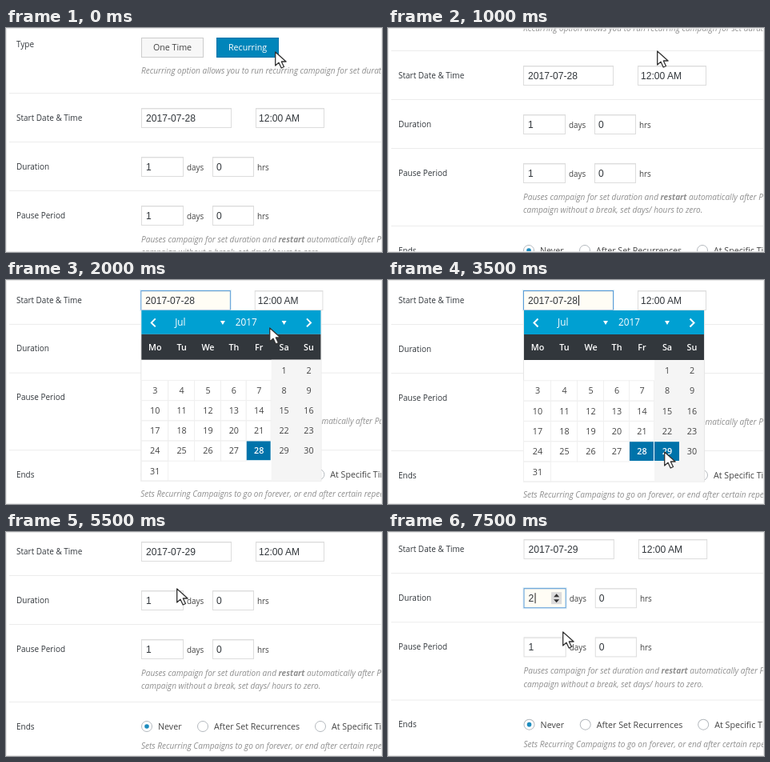
Recreate the animation shown at these times as an HTML page. Size 470 by 280 pixels, loop 8 s.

```html
<!DOCTYPE html>
<html lang="en">
<head>
<meta charset="utf-8">
<title>Schedule form</title>
<style>
html, body { margin: 0; width: 100%; height: 100%; overflow: hidden; background: #fff; }
svg { display: block; font-family: "Open Sans", "Noto Sans", sans-serif; }
.label { font-size: 10px; fill: #32373c; }
.unit { font-size: 9.9px; fill: #444; }
.note { font-size: 10.08px; font-style: italic; fill: #8f8f8f; }
.opt { font-size: 10.7px; fill: #444; }
.field { font: 12.1px "Liberation Sans", Arial, sans-serif; fill: #32373c; }
.day { font-size: 10.8px; fill: #444; }
.on { font-size: 10.8px; fill: #fff; font-weight: 600; }
.head { font-size: 11.8px; fill: #fff; }
.mid { text-anchor: middle; }
</style>
</head>
<body>
<svg id="stage" width="470" height="280" viewBox="0 0 470 280"></svg>
<script>
const LOOP = 8000;

// y: centre of the start date row, zoom: slight camera zoom, at: pointer tip
const states = [
  { t: 0, y: 112, at: [336, 29] },
  { t: 500, y: 85, at: [336, 29] },
  { t: 1000, y: 59, at: [336, 28] },
  { t: 1500, y: 26, at: [262, 27] },
  { t: 2000, y: 25, zoom: .996, at: [329, 59], picked: [28] },
  { t: 3000, y: 25, zoom: .996, at: [345, 214], picked: [28, 29] },
  { t: 3500, y: 25, at: [345, 214], picked: [28, 29], caret: true },
  { t: 4000, y: 24, day: 29, at: [345, 214] },
  { t: 4500, y: 24, day: 29, at: [287, 126] },
  { t: 5500, y: 24, day: 29, at: [213, 70] },
  { t: 6000, y: 22, zoom: 1.005, day: 29, at: [212, 82], spin: true },
  { t: 6500, y: 21, zoom: 1.003, day: 29, at: [212, 82], spin: true, days: 2, caret: true },
  { t: 7500, y: 21, zoom: 1.003, day: 29, at: [218, 124], spin: true, days: 2, caret: true }
];

const text = (x, y, cls, str) => `<text x="${x}" y="${y}" class="${cls}">${str}</text>`;
const rect = (x, y, w, h, fill, more = "") =>
  `<rect x="${x}" y="${y}" width="${w}" height="${h}" fill="${fill}" ${more}/>`;
const path = (d, more) => `<path d="${d}" ${more}/>`;
const stroke = color => `stroke="${color}"`;

function field(x, y, w, value, focus, pad = 6) {
  const top = y - 11.5;
  return (focus ? rect(x - .5, top - 1, w + 1, 26, "none", 'stroke="#1e8cbe" stroke-opacity=".15"') : "")
    + rect(x + .5, top, w - 1, 24, focus ? "#fffdf5" : "#fff", stroke(focus ? "#5b9dd9" : "#ddd"))
    + rect(x + 1, top + .5, w - 2, 1, "#000", 'opacity=".06"')
    + text(x + pad, y + 4.8, "field", value);
}

const caret = (x, y) => rect(x, y - 6, 1, 13, "#222");

function button(x, y, str, fill, edge, ink) {
  return rect(x + .5, y - 11.5, 77, 24, fill, stroke(edge))
    + `<text x="${x + 39}" y="${y + 4}" class="opt mid" style="fill:${ink}">${str}</text>`;
}

function radio(x, y, str, on) {
  return `<circle cx="${x}" cy="${y}" r="6.5" fill="#fff" stroke="#b4b9be"/>`
    + (on ? `<circle cx="${x}" cy="${y}" r="2.8" fill="#1e8cbe"/>` : "")
    + text(x + 14, y + 4, "opt", str);
}

function spinner(x, y) {
  return rect(x, y - 7, 13, 15, "#dcdcdc")
    + path(`M${x + 3} ${y - 1}l3.5 -4 3.5 4zM${x + 3} ${y + 2}l3.5 4 3.5 -4z`, 'fill="#333"');
}

function period(y, days, spin) {
  return field(169, y, 53, days, spin) + text(226, y + 4.6, "unit", "days")
    + field(258, y, 52, 0, false, 5) + text(314, y + 4.6, "unit", "hrs");
}

function calendar(top, picked) {
  const edges = [170, 204, 237, 270, 302, 333, 365, 395], rowH = 25.3;
  const centre = c => (edges[c] + edges[c + 1]) / 2;
  const arrow = x => path(`M${x - 3} ${top + 13}h6l-3 5z`, 'fill="#fff"');
  const chevron = (x, d) => path(`M${x + 2.5 * d} ${top + 10.5}l${-5 * d} 5 ${5 * d} 5`,
    'fill="none" stroke="#fff" stroke-width="2"');
  const body = top + 62;
  let out = rect(169.5, top, 226, 214, "#fff", stroke("#e6e6e6"))
    + rect(170, top, 225, 30, "#00a0d2")
    + rect(170, top + 30, 225, 32, "#32373c")
    + rect(333, body, 62, rowH * 6, "#f5f5f5")
    + chevron(185, 1) + chevron(380, -1) + arrow(272) + arrow(349)
    + text(212, top + 19.2, "head", "Jul") + text(288, top + 19.2, "head", "2017");
  ["Mo", "Tu", "We", "Th", "Fr", "Sa", "Su"].forEach((name, c) => {
    out += text(centre(c), top + 50, "on mid", name);
  });
  for (let d = 1; d <= 31; d++) {
    const c = (d + 4) % 7, y = body + Math.floor((d + 4) / 7) * rowH;
    const on = picked.includes(d), w = edges[c + 1] - edges[c];
    if (on) out += rect(edges[c], y + 1, w - 1, rowH - 1.5, "#0073aa");
    else if (c < 5) out += rect(edges[c] - .5, y + .5, w, rowH, "none", stroke("#f0f0f0"));
    out += text(centre(c), y + 17, on ? "on mid" : "day mid", d);
  }
  return out;
}

function pointer([x, y]) {
  return path(`M${x + .7} ${y + 1}v17l4.3 -3.8 3.2 6.8 3.3 -1.5 -3.2 -6.5h5.8z`,
    'fill="#fff" stroke="#333" stroke-width="1.3" stroke-linejoin="round"');
}

function scene({ y, zoom = 1, day = 28, at, picked, spin, days = 1, caret: blink }) {
  const duration = y + 61, pause = y + 122, ends = y + 219;
  const labels = [[-92, "Type"], [0, "Start Date &amp; Time"], [61, "Duration"], [122, "Pause Period"], [219, "Ends"]]
    .map(([dy, str]) => text(13, y + dy + 3.6, "label", str)).join("");
  const lines = [-31, 30, 91, 188].map(dy => rect(4, y + dy, 470, 1, "#ececec")).join("");
  const notes = [
    [-59, "Recurring option allows you to run recurring campaign for set duration"],
    [152, 'Pauses campaign for set duration and <tspan font-weight="700">restart</tspan> automatically after Pause'],
    [168, "campaign without a break, set days/ hours to zero."],
    [243, "Sets Recurring Campaigns to go on forever, or end after certain repeats"]
  ].map(([dy, str]) => text(169, y + dy + 4, "note", str)).join("");

  const fields = button(169, y - 88, "One Time", "#f7f7f7", "#ccc", "#444")
    + button(263, y - 88, "Recurring", "#0085ba", "#0073aa", "#fff")
    + field(169, y, 113, "2017-07-" + day, picked)
    + field(312, y, 86, "12:00 AM", false, 4)
    + period(duration, days, spin) + period(pause, 1)
    + radio(176, ends, "Never", true)
    + radio(246, ends, "After Set Recurrences")
    + radio(393, ends, "At Specific Time")
    + (spin ? spinner(203.5, duration) : "")
    + (picked ? calendar(y + 13, picked) : "")
    + (blink ? (spin ? caret(183, duration) : caret(238, y)) : "");

  return rect(0, 0, 470, 280, "#fff")
    + `<g transform="translate(0 ${y}) scale(${zoom}) translate(0 ${-y})">${lines}${labels}${notes}${fields}</g>`
    + pointer(at)
    + rect(.5, .5, 469, 279, "none", stroke("#e8e8e8"));
}

const stage = document.getElementById("stage");
const start = performance.now();
let shown;

function tick() {
  const t = (performance.now() - start) % LOOP;
  const state = states.findLast(s => s.t <= t) || states[0];
  if (state !== shown) stage.innerHTML = scene(shown = state);
  requestAnimationFrame(tick);
}
tick();
</script>
</body>
</html>
```
